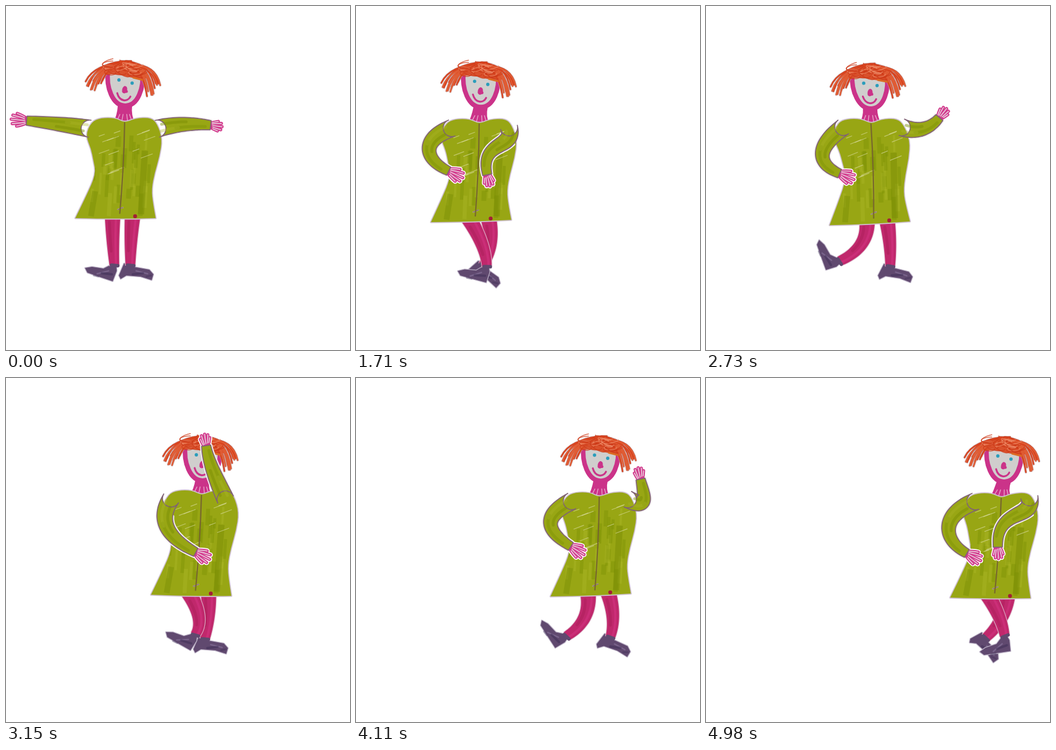
An HTML page with a canvas that plays this animation: 600 by 600 pixels, repeating every 5010 ms.

```html
<!DOCTYPE html>
<html lang="en">
<head>
<meta charset="utf-8">
<title>Dancing felt-tip figure</title>
<style>
html, body { margin: 0; width: 100%; height: 100%; overflow: hidden; background: #fff; }
canvas { display: block; width: 600px; height: 600px; }
</style>
</head>
<body>
<canvas id="stage" width="600" height="600"></canvas>
<script>
const ctx = document.getElementById('stage').getContext('2d');
const LOOP = 5010, STEP = 30;
const GREEN = '#98a614', EDGE = '#806276', PINK = '#cb3389', LEG = '#c0286c', SHOE = '#60496f';

// time, neck x y, hem x, hem y left and right, head x y, head turn
const body = [
  [0, 207, 202, 198, 370, 370, 208, 140, 0],
  [1110, 211, 202, 200, 370, 369, 213, 140, 0],
  [1650, 214, 204, 206, 376, 373, 217, 142, 0],
  [2280, 241, 205, 254, 387, 371, 240, 145, -0.13],
  [3150, 341, 203, 330, 378, 380, 343, 145, 0],
  [3720, 402, 208, 380, 383, 376, 410, 146, 0],
  [4500, 448, 205, 454, 379, 376, 445, 145, 0],
  [4980, 515, 208, 503, 383, 384, 520, 147, 0]
];
// time, then four curve points measured from the neck
const armL = [
  [0, -61, 12, -95, 6, -130, 2, -171, -2],
  [1110, -62, 12, -99, 6, -134, 2, -174, -3],
  [1300, -62, 12, -99, 6, -134, 3, -172, 0],
  [1640, -48, 9, -105, 32, -100, 70, -62, 90],
  [2280, -47, 7, -57, -48, -72, -105, -11, -92],
  [2480, -46, 7, -108, 35, -112, 60, -75, 70],
  [3150, -53, 7, -83, 52, -47, 82, -10, 101],
  [3430, -48, 7, -100, 32, -95, 60, -50, 80],
  [3720, -52, 4, -68, -50, -76, -106, -18, -98],
  [4090, -48, 8, -100, 32, -95, 60, -50, 85],
  [4500, -46, 10, -70, 57, -11, 57, -6, 113],
  [4980, -45, 7, -110, 32, -100, 77, -60, 98]
];
const armR = [
  [0, 57, 12, 85, 4, 120, 2, 150, 6],
  [1110, 57, 12, 85, 2, 120, 4, 148, 15],
  [1300, 57, 12, 87, 2, 122, 6, 149, 20],
  [1640, 52, 8, 66, 46, 0, 30, 14, 90],
  [2280, 53, 5, 59, 41, -3, 27, 19, 91],
  [2680, 54, 8, 72, 22, 95, 25, 112, 5],
  [2830, 52, 6, 78, -6, 105, -25, 128, -42],
  [3010, 48, 4, 58, -40, 62, -70, 50, -98],
  [3150, 42, 9, 28, -22, 12, -55, 8, -85],
  [3430, 46, 5, 70, 40, 10, 0, 5, -10],
  [3720, 38, 2, 78, 37, -17, 7, -52, 39],
  [4150, 50, 5, 88, 22, 80, -5, 75, -38],
  [4500, 50, 2, 52, -45, 56, -75, 41, -101],
  [4980, 49, 0, 60, 40, -10, 17, -6, 87]
];
// time, ankle x y, shoe turn in degrees, knee bend
const legL = [
  [0, 189, 452, 0, -1], [1110, 187, 452, 0, -2], [1500, 205, 452, -10, 4],
  [1800, 234, 455, 0, 8], [2280, 238, 456, 13, 6], [2700, 232, 446, 50, 14],
  [2900, 260, 440, 57, 14], [3150, 330, 448, 11, 12], [3380, 366, 450, -27, 5],
  [3720, 370, 455, 12, 9], [4330, 366, 446, 50, 14], [4500, 405, 440, 57, 14],
  [4750, 478, 448, 11, 12], [4980, 521, 450, -27, 5]
];
const legR = [
  [0, 217, 452, 0, -1], [1110, 220, 452, 0, -1], [1700, 222, 452, 25, 8],
  [2280, 252, 450, 41, 16], [2600, 306, 452, 10, 5], [2900, 336, 455, 0, 0],
  [3150, 347, 455, 0, 3], [3380, 350, 453, 35, 8], [3720, 377, 447, 60, 15],
  [3880, 395, 448, 42, 16], [4200, 458, 453, 8, 3], [4500, 479, 455, 0, -1],
  [4980, 488, 453, 38, 8]
];
const shoeL = [[3, -4], [4, 10], [-3, 28], [-24, 21], [-47, 13], [-51, 5], [-39, 3], [-19, 6], [-7, 0]];
const shoeR = [[-11, -3], [5, 3], [33, 8], [40, 16], [37, 26], [18, 20], [-7, 18], [-17, 24], [-20, 18]];
// coat side: offset from the seam, height from neck (0) to hem (1)
const coat = [
  [-77, 1], [-60, .77], [-45, .54], [-51, .4], [-56, .28], [-67, .14], [-58, 0], [-42, -.04],
  [-17, -.04], [0, .01], [18, -.035], [45, -.045], [57, .02], [67, .18], [64, .36],
  [57, .53], [53, .7], [57, .85], [63, 1]
];

let seed = 7;
const rnd = (a, b) => {
  seed = (seed * 16807) % 2147483647;
  return a + (b - a) * seed / 2147483647;
};
const list = (n, make) => Array.from({ length: n }, (_, i) => make(i));
const lerp = (a, b, k) => a + (b - a) * k;

const streaks = list(34, () => ({
  u: rnd(-50, 50), v: rnd(.04, .75), h: rnd(.1, .24), w: rnd(4, 9),
  c: rnd(0, 1) < .55 ? 'rgba(122,142,4,.38)' : 'rgba(172,182,42,.4)'
}));
const flecks = list(15, i => ({ u: i % 3 ? rnd(-46, -14) : rnd(12, 38), v: rnd(.1, .56), w: rnd(8, 24) }));
const strands = list(28, i => {
  const s = i % 2 ? 1 : -1, k = (i >> 1) / 13;
  return {
    s, x: rnd(-8, 12), y: rnd(-44, -34), cx: s * lerp(28, 54, k), cy: rnd(-46, -36),
    ex: s > 0 ? lerp(36, 61, k) : -lerp(40, 69, k),
    ey: s > 0 ? rnd(-8, 18) : rnd(-14, 8), c: rnd(0, 1) < .5 ? '#d8441f' : '#e05c34'
  };
});
const scribble = list(22, () => ({ x: rnd(-27, 24), y: rnd(-40, -22), r: rnd(8, 17), q: rnd(4, 8), a: rnd(-.3, .6) }));

// smooth curve through the keys without overshoot
function sample(keys, t) {
  const n = keys.length - 1;
  if (t >= keys[n][0]) return keys[n].slice(1);
  let i = 0;
  while (t >= keys[i + 1][0]) i++;
  const a = keys[i], b = keys[i + 1], h = b[0] - a[0], k = (t - a[0]) / h;
  const rate = (j, c) => j < 0 || j >= n ? 0 : (keys[j + 1][c] - keys[j][c]) / (keys[j + 1][0] - keys[j][0]);
  const slope = (j, c) => {
    const p = rate(j - 1, c), q = rate(j, c);
    return p * q <= 0 ? 0 : 2 * p * q / (p + q);
  };
  return a.slice(1).map((_, m) => {
    const c = m + 1, k2 = k * k, k3 = k2 * k;
    return a[c] * (2 * k3 - 3 * k2 + 1) + b[c] * (3 * k2 - 2 * k3) +
      h * (slope(i, c) * (k3 - 2 * k2 + k) + slope(i + 1, c) * (k3 - k2));
  });
}

function smooth(pts, join) {
  join ? ctx.lineTo(...pts[0]) : ctx.moveTo(...pts[0]);
  for (let i = 1; i < pts.length - 1; i++) {
    const p = pts[i], q = pts[i + 1], last = i === pts.length - 2;
    ctx.quadraticCurveTo(p[0], p[1], last ? q[0] : (p[0] + q[0]) / 2, last ? q[1] : (p[1] + q[1]) / 2);
  }
}
function stroke(color, width) {
  ctx.strokeStyle = color;
  ctx.lineWidth = width;
  ctx.stroke();
}
function fill(color) {
  ctx.fillStyle = color;
  ctx.fill();
}
function line(color, width, ...p) {
  ctx.beginPath();
  ctx.moveTo(p[0], p[1]);
  if (p.length > 4) ctx.quadraticCurveTo(p[2], p[3], p[4], p[5]);
  else ctx.lineTo(p[2], p[3]);
  stroke(color, width);
}
function at(x, y, turn, draw) {
  ctx.save();
  ctx.translate(x, y);
  ctx.rotate(turn);
  draw();
  ctx.restore();
}

const bezier = p => list(21, i => {
  const t = i / 20, s = 1 - t;
  const f = c => s * s * s * p[c] + 3 * s * s * t * p[c + 2] + 3 * s * t * t * p[c + 4] + t * t * t * p[c + 6];
  return [f(0), f(1)];
});
// both edges of a limb along its middle line
function edges(mid, half) {
  const n = mid.length - 1;
  return [1, -1].map(s => mid.map((p, i) => {
    const a = mid[Math.max(0, i - 1)], b = mid[Math.min(n, i + 1)];
    const dx = b[0] - a[0], dy = b[1] - a[1], d = Math.hypot(dx, dy) || 1, w = s * half(i / n);
    return [p[0] + dy / d * w, p[1] - dx / d * w];
  }));
}

function drawHand(x, y, turn, size) {
  at(x, y, turn, () => {
    const tips = [-.85, -.42, 0, .4, .8];
    const pass = (color, width) => tips.forEach((a, i) => {
      const r = size * [.72, .94, 1, .95, .75][i];
      line(color, width, -2, a * 4, r * .45, a * r * .55, r * Math.cos(a * .65), r * Math.sin(a * .72));
    });
    pass('#fff', 9);
    pass('#d23b8d', 5.6);
    pass('#e9cbdc', 1.7);
    line('#d23b8d', 4, -1, -5, 2, 5);
  });
}

function drawArm(track, t, nx, ny, size) {
  const p = sample(track, t).map((v, i) => v + (i % 2 ? ny : nx));
  const mid = bezier(p);
  const [a, b] = edges(mid, u => 15 - 7 * Math.pow(u, 1.3));
  [a, b].forEach(side => {
    ctx.beginPath();
    smooth(side.slice(5));
    stroke('#f6f2f2', 5.5);
  });
  const start = Math.atan2(a[0][1] - mid[0][1], a[0][0] - mid[0][0]);
  drawHand(p[6], p[7], Math.atan2(p[7] - p[5], p[6] - p[4]), size);
  ctx.beginPath();
  smooth(a);
  smooth([...b].reverse(), true);
  ctx.arc(mid[0][0], mid[0][1], 15, start + Math.PI, start, true);
  ctx.closePath();
  fill(GREEN);
  stroke(EDGE, 1.7);
  const inner = edges(mid, u => 6 - 3 * u);
  [[0, 2, 12, 'rgba(120,140,4,.45)'], [1, 7, 19, 'rgba(122,142,4,.4)'], [1, 1, 9, 'rgba(172,182,42,.35)']].forEach(([s, i, j, c]) => {
    ctx.beginPath();
    smooth(inner[s].slice(i, j));
    stroke(c, 5);
  });
}

function drawLeg(track, t, hx, hy, shoe) {
  const [x, y, turn, bend] = sample(track, t);
  const kx = (hx + x) / 2 + bend * 2, ky = (hy + y) / 2 + Math.abs(bend) * .9;
  const mid = list(15, i => {
    const k = i / 14, s = 1 - k;
    return [s * s * hx + 2 * s * k * kx + k * k * x, s * s * hy + 2 * s * k * ky + k * k * y];
  });
  at(x, y, turn * Math.PI / 180, () => {
    ctx.beginPath();
    shoe.forEach(p => ctx.lineTo(...p));
    ctx.closePath();
    stroke('#b9aec3', 2.6);
    fill(SHOE);
    const s = shoe === shoeL ? -1 : 1;
    line('rgba(140,120,160,.55)', 2.5, s * 10, 10, s * 30, 15);
    line('rgba(58,42,82,.45)', 4, s * 4, 16, s * 22, 14);
    line('rgba(58,42,82,.35)', 3, s * 28, 20, s * 36, 18);
  });
  const [a, b] = edges(mid, u => 13.5 - 5.2 * u);
  ctx.beginPath();
  smooth(a);
  smooth([...b].reverse(), true);
  ctx.closePath();
  stroke('#dcb5c8', 2.2);
  fill(LEG);
  const [c, d] = edges(mid, u => 6 - 3 * u);
  ctx.beginPath();
  smooth(c);
  stroke('rgba(214,52,130,.55)', 4);
  ctx.beginPath();
  smooth(d.slice(2, 11));
  stroke('rgba(165,28,85,.4)', 5);
  at(x, y, turn * Math.PI / 180, () => line(SHOE, 6, -5, 0, 6, 1));
}

function drawNeck(nx, ny, hx, hy) {
  ctx.beginPath();
  ctx.moveTo(hx - 13, hy + 34);
  ctx.lineTo(hx + 12, hy + 34);
  ctx.quadraticCurveTo(nx + 11, ny - 12, nx + 18, ny + 2);
  ctx.lineTo(nx - 20, ny + 2);
  ctx.quadraticCurveTo(nx - 13, ny - 12, hx - 13, hy + 34);
  fill(PINK);
  [-11, -4, 4, 10].forEach(d => line('rgba(244,214,230,.75)', 1.3, lerp(hx, nx, .6) + d * .8, ny - 13, nx + d * 1.25, ny - 1));
}

function drawCoat([nx, ny, hx, ly, ry]) {
  const map = ([u, v]) => [lerp(nx, hx, v) + u, lerp(ny, lerp(ly, ry, (u + 77) / 140), v)];
  ctx.beginPath();
  smooth(coat.map(map));
  const m = map([0, 1.01]);
  ctx.quadraticCurveTo(m[0], m[1], ...map(coat[0]));
  ctx.closePath();
  stroke('#cfc2d0', 3.4);
  fill(GREEN);
  ctx.save();
  ctx.clip();
  ctx.lineCap = 'butt';
  streaks.forEach(s => line(s.c, s.w, ...map([s.u, s.v]), ...map([s.u, s.v + s.h])));
  line('rgba(118,138,4,.45)', 11, ...map([38, .3]), ...map([37, .96]));
  line('rgba(118,138,4,.4)', 10, ...map([-45, .72]), ...map([-50, .98]));
  ctx.lineCap = 'round';
  flecks.forEach(f => line('rgba(222,224,170,.6)', 1.2, ...map([f.u, f.v]), ...map([f.u + f.w, f.v - f.w * .0022])));
  line('#e6e4c8', 2, ...map([-4, .91]), ...map([5, .89]));
  ctx.restore();
  stroke(EDGE, 1.6);
  line('#77662e', 2.2, ...map([0, .01]), ...map([3, .5]), ...map([0, .95]));
  ctx.beginPath();
  ctx.arc(...map([27, .98]), 3.4, 0, 7);
  fill('#a31f35');
}

function drawHead(x, y, turn) {
  at(x, y, turn, () => {
    ctx.beginPath();
    ctx.moveTo(-30, -28);
    ctx.bezierCurveTo(-34, 2, -22, 34, 0, 34);
    ctx.bezierCurveTo(22, 34, 33, 4, 30, -28);
    ctx.closePath();
    fill('#d0cecd');
    ctx.beginPath();
    ctx.moveTo(-30, -28);
    ctx.bezierCurveTo(-34, 2, -22, 34, 0, 34);
    ctx.bezierCurveTo(22, 34, 33, 4, 30, -28);
    stroke(PINK, 8);
    [[-11, -11], [12, -5.5]].forEach(([ex, ey]) => {
      ctx.beginPath();
      ctx.arc(ex, ey, 2.9, 0, 7);
      fill('#2b9dbb');
    });
    ctx.beginPath();
    ctx.ellipse(-1, 6, 4.4, 6.5, .2, 0, 7);
    fill(PINK);
    line(PINK, 5, -3, 9, 2, 9);
    ctx.beginPath();
    ctx.moveTo(-14, 12);
    ctx.bezierCurveTo(-10, 27, 4, 28, 9, 18);
    stroke(PINK, 3.2);

    strands.forEach(s => line('rgba(186,150,152,.75)', 4.2, s.x, s.y, s.cx, s.cy, s.ex, s.ey));
    ctx.beginPath();
    ctx.moveTo(-36, -20);
    ctx.bezierCurveTo(-30, -46, 8, -48, 28, -36);
    ctx.quadraticCurveTo(37, -26, 38, -14);
    ctx.quadraticCurveTo(20, -12, 2, -17);
    ctx.quadraticCurveTo(-16, -23, -36, -20);
    fill('#d9502b');
    strands.forEach(s => line(s.c, 2.5, s.x, s.y, s.cx, s.cy, s.ex, s.ey));
    scribble.forEach((s, i) => {
      ctx.beginPath();
      ctx.ellipse(s.x, s.y + s.x * .08, s.r, s.q * .7, s.a, 0, 5);
      stroke(i % 3 ? 'rgba(204,58,24,.75)' : 'rgba(238,140,105,.7)', 1.5);
    });
    line('#dd6b22', 3, 14, -15, 30, -11);
  });
}

function draw(t) {
  ctx.fillStyle = '#fff';
  ctx.fillRect(0, 0, 600, 600);
  ctx.lineCap = ctx.lineJoin = 'round';
  const pose = sample(body, t);
  const [nx, ny, hx, ly, ry, x, y, turn] = pose;
  const hip = (ly + ry) / 2 - 6;
  drawLeg(legR, t, hx + 23, hip, shoeR);
  drawLeg(legL, t, hx - 12, hip, shoeL);
  drawNeck(nx, ny, x, y);
  drawCoat(pose);
  drawHead(x, y, turn);
  drawArm(armL, t, nx, ny, 27);
  drawArm(armR, t, nx, ny, 20);
}

const begin = performance.now();
function tick() {
  const t = (performance.now() - begin) % LOOP;
  draw(Math.floor(t / STEP) * STEP);
  requestAnimationFrame(tick);
}
tick();
</script>
</body>
</html>
```
